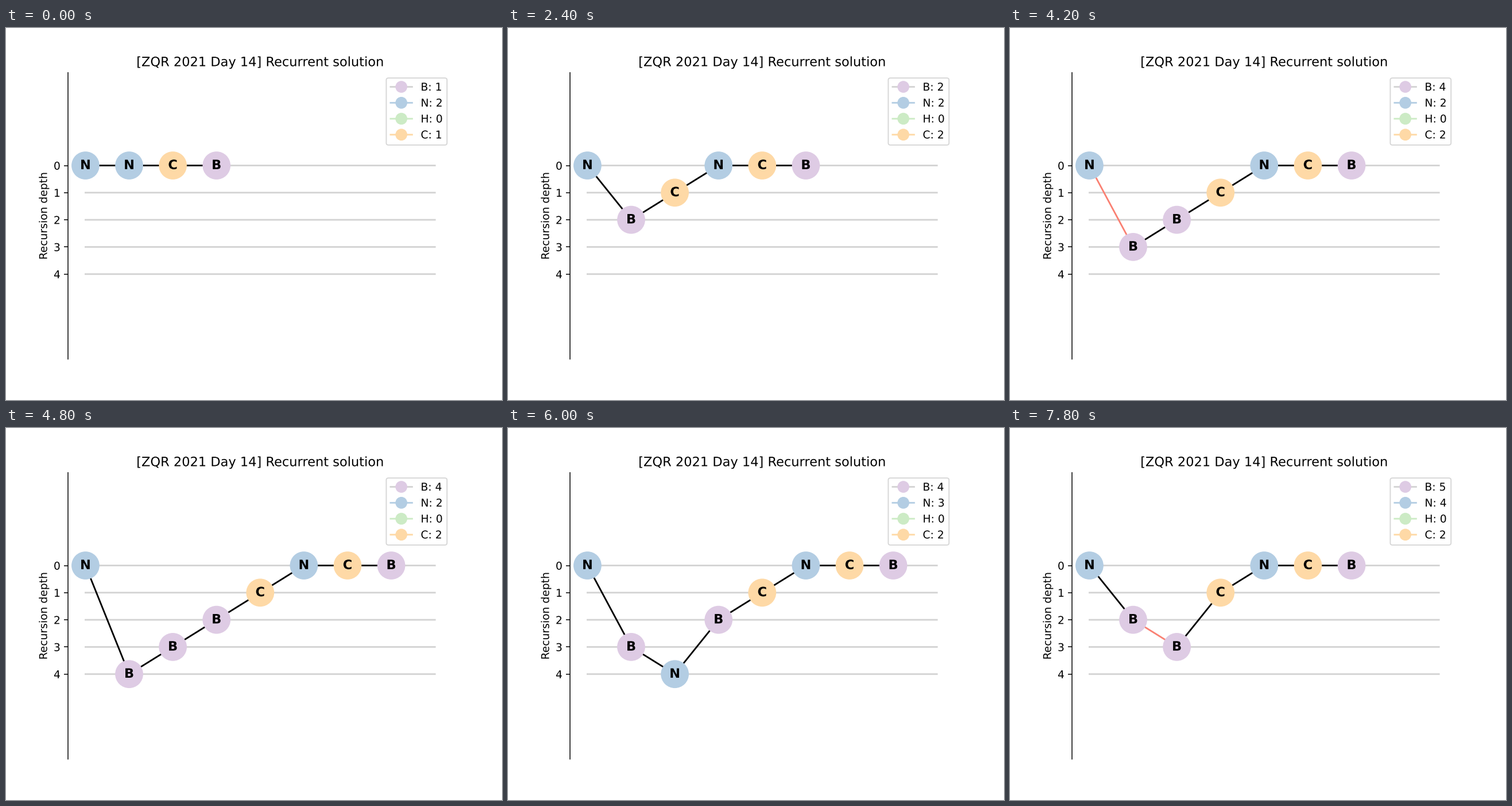
Recreate the animation shown at these times as a matplotlib script. Size 864 px wide and 648 px high, loop 8 s.

```python
from itertools import islice

import matplotlib.pyplot as plt
from matplotlib.animation import FuncAnimation
from matplotlib.lines import Line2D
from matplotlib.patheffects import Normal

TEMPLATE = "NNCB"
RULES = {"NN": "C", "NC": "B", "NB": "B", "BB": "N", "BC": "B"}
MAX_DEPTH = 4
WIDTH = 8
STEP_MS, TICK_MS, LOOP_MS = 600, 200, 8000
COLORS = {"B": "#decbe4", "N": "#b3cde3", "H": "#ccebc5", "C": "#fed9a6"}
GUIDE = "lightgray"

# Draw lines, markers and text at sub-pixel positions.
plt.rcParams["path.snap"] = False
plt.rcParams["path.effects"] = [Normal()]
plt.rcParams["text.hinting"] = "no_hinting"


def expand(chain, counts, i, depth):
    """Grow the pair at i depth first, yielding (chain, counts, active link)."""
    if depth > MAX_DEPTH:
        return
    new = RULES[chain[i][0] + chain[i + 1][0]]
    counts[new] += 1
    yield list(chain), dict(counts), i
    chain.insert(i + 1, (new, depth))
    yield list(chain), dict(counts), None
    yield from expand(chain, counts, i, depth + 1)
    yield from expand(chain, counts, i + 1, depth + 1)
    del chain[i + 1]


def walk():
    chain = [(letter, 0) for letter in TEMPLATE]
    counts = {letter: TEMPLATE.count(letter) for letter in COLORS}
    yield list(chain), dict(counts), None
    yield from expand(chain, counts, 0, 1)


steps = list(islice(walk(), -(-LOOP_MS // STEP_MS)))

fig, ax = plt.subplots(figsize=(6.4, 4.8), dpi=135)
ax.set_title("[ZQR 2021 Day 14] Recurrent solution")
ax.set_ylabel("Recursion depth")
ax.set_xlim(-0.4, WIDTH + 0.4)
ax.set_ylim(7.13, -3.42)
ax.set_xticks([])
ax.set_yticks(range(MAX_DEPTH + 1))
ax.spines[["top", "right", "bottom"]].set_visible(False)

for depth in range(MAX_DEPTH + 1):
    ax.plot([0, WIDTH], [depth, depth], color=GUIDE, zorder=1)

handles = [
    Line2D([], [], color=GUIDE if letter == "B" else color, marker="o",
           markersize=10, markerfacecolor=color, markeredgecolor=color)
    for letter, color in COLORS.items()
]
legend = ax.legend(handles, [f"{letter}: 0" for letter in COLORS],
                   loc="upper right")

links = [ax.plot([], [], zorder=2)[0] for _ in range(WIDTH)]
discs = [ax.plot([], [], "o", markersize=25, zorder=3)[0]
         for _ in range(WIDTH + 1)]
names = [ax.text(x, 0, "", weight="bold", size=12, ha="center", va="center",
                 zorder=4) for x in range(WIDTH + 1)]


def update(frame):
    chain, counts, active = steps[frame * TICK_MS // STEP_MS]
    for x, (disc, name) in enumerate(zip(discs, names)):
        shown = x < len(chain)
        disc.set_visible(shown)
        name.set_visible(shown)
        if shown:
            letter, depth = chain[x]
            disc.set_data([x], [depth])
            disc.set_color(COLORS[letter])
            name.set_text(letter)
            name.set_y(depth)
    for x, link in enumerate(links):
        shown = x + 1 < len(chain)
        link.set_visible(shown)
        if shown:
            link.set_data([x, x + 1], [chain[x][1], chain[x + 1][1]])
            link.set_color("salmon" if x == active else "black")
    for label, letter in zip(legend.get_texts(), COLORS):
        label.set_text(f"{letter}: {counts[letter]}")
    return [*links, *discs, *names, legend]


anim = FuncAnimation(fig, update, frames=LOOP_MS // TICK_MS, interval=TICK_MS,
                     repeat=True, repeat_delay=0)
plt.show()
```
